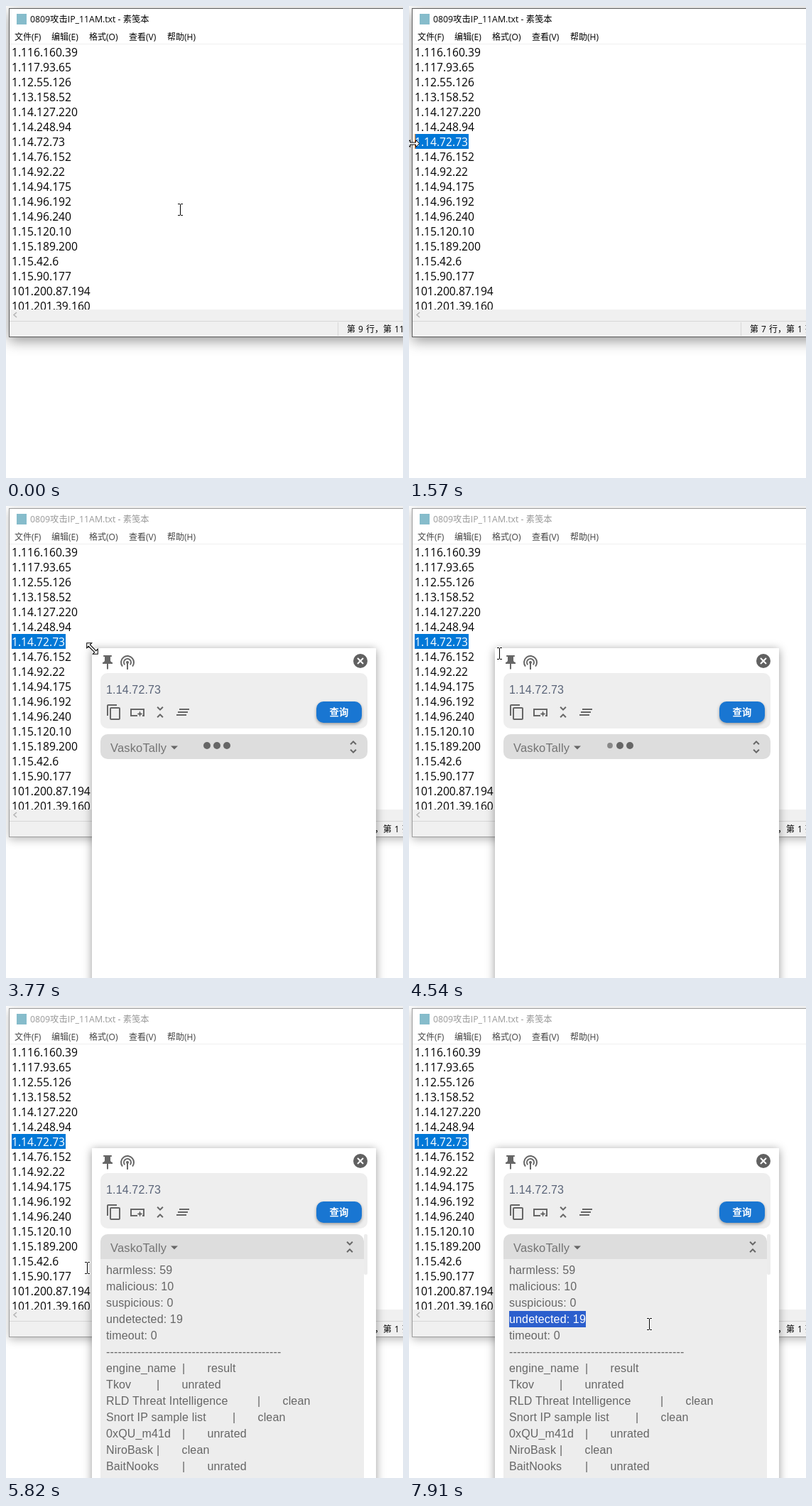
These frames come from a looping animation (559 by 664 pixels, 8000 ms). An HTML page with a canvas:

```html
<!DOCTYPE html>
<html lang="zh">
<head>
<meta charset="utf-8">
<style>
html, body { margin: 0; width: 559px; height: 664px; overflow: hidden; background: #fff; }
canvas { display: block; }
</style>
</head>
<body>
<canvas id="stage" width="559" height="664"></canvas>
<script>
const W = 559, H = 664, LOOP = 8000;
const view = document.getElementById('stage').getContext('2d');
const layer = document.createElement('canvas');
layer.width = W;
layer.height = 720;
const panelCtx = layer.getContext('2d');

const UI = '"Open Sans", "Noto Sans CJK SC", "Noto Sans CJK", sans-serif';
const ARIAL = '"Liberation Sans", Arial, sans-serif';
const LIST_FONT = '15.64px ' + UI;
const GREY = '#666';

const FOCUS = 2960, OPEN = 3000, RESULT = 4560;
const IP = '1.14.72.73';
const ips = ['1.116.160.39', '1.117.93.65', '1.12.55.126', '1.13.158.52', '1.14.127.220',
  '1.14.248.94', IP, '1.14.76.152', '1.14.92.22', '1.14.94.175', '1.14.96.192',
  '1.14.96.240', '1.15.120.10', '1.15.189.200', '1.15.42.6', '1.15.90.177',
  '101.200.87.194', '101.201.39.160'];
const menus = [['文件(F)', 12], ['编辑(E)', 64], ['格式(O)', 117], ['查看(V)', 173], ['帮助(H)', 227]];
const counts = ['harmless: 59', 'malicious: 10', 'suspicious: 0', 'undetected: 19', 'timeout: 0', '-'.repeat(45)];
// name, x of the bar, verdict
const engines = [['engine_name', 248, 'result'], ['Tkov', 212, 'unrated'],
  ['RLD Threat Intelligence', 354, 'clean'], ['Snort IP sample list', 319, 'clean'],
  ['0xQU_m41d', 248, 'unrated'], ['NiroBask', 212, 'clean'], ['BaitNooks', 248, 'unrated']];

// pointer path: time, x, y
const path = [[0, 245, 286], [30, 245, 286], [450, 172, 238], [800, 92, 200], [870, 90, 199],
  [1370, 5, 193], [1570, 5, 193], [1920, 121, 203], [2830, 121, 203], [2960, 121, 200],
  [4400, 121, 200], [4480, 124, 202], [5130, 259, 389], [5290, 259, 389], [5400, 274, 384],
  [5600, 132, 372], [5750, 132, 372], [5850, 109, 367], [6000, 281, 404], [6260, 281, 404],
  [6320, 272, 419], [6600, 272, 419], [6660, 254, 416], [6820, 254, 416], [7050, 275, 402],
  [7250, 150, 370], [7620, 133, 447], [7650, 133, 447], [7720, 109, 447], [7905, 338, 447],
  [8000, 338, 447]];

const icons = {
  pin: 'M16 9V4h1c.55 0 1-.45 1-1s-.45-1-1-1H7c-.55 0-1 .45-1 1s.45 1 1 1h1v5c0 1.66-1.34 3-3 3v2h5.97v7l1 1 1-1v-7H19v-2c-1.66 0-3-1.34-3-3z',
  copy: 'M16 1H4c-1.1 0-2 .9-2 2v14h2V3h12V1zm3 4H8c-1.1 0-2 .9-2 2v14c0 1.1.9 2 2 2h11c1.1 0 2-.9 2-2V7c0-1.1-.9-2-2-2zm0 16H8V7h11v14z',
  fold: 'M7.41 18.59L8.83 20 12 16.83 15.17 20l1.41-1.41L12 14l-4.59 4.59zm9.18-13.18L15.17 4 12 7.17 8.83 4 7.41 5.41 12 10l4.59-4.59z',
  unfold: 'M12 5.83L15.17 9l1.41-1.41L12 3 7.41 7.59 8.83 9 12 5.83zm0 12.34L8.83 15l-1.41 1.41L12 21l4.59-4.59L15.17 15 12 18.17z',
  lines: 'M5 13h14v-2H5v2zm-2 4h14v-2H3v2zM7 7v2h14V7H7z',
  drop: 'M7 10l5 5 5-5z'
};
for (const k in icons) icons[k] = new Path2D(icons[k]);

const clamp = (v, a = 0, b = 1) => Math.min(b, Math.max(a, v));
const smooth = p => p * p * (3 - 2 * p);
const out = p => 1 - (1 - p) ** 2;

function pointer(t) {
  let i = 1;
  while (i < path.length - 1 && path[i][0] <= t) i++;
  const [t0, x0, y0] = path[i - 1], [t1, x1, y1] = path[i];
  const p = smooth(clamp((t - t0) / (t1 - t0)));
  return { x: Math.round(x0 + (x1 - x0) * p), y: Math.round(y0 + (y1 - y0) * p) };
}

function rect(c, x, y, w, h, color) {
  c.fillStyle = color;
  c.fillRect(x, y, w, h);
}

function round(c, x, y, w, h, r, color) {
  c.fillStyle = color;
  c.beginPath();
  c.roundRect(x, y, w, h, r);
  c.fill();
}

function text(c, s, x, y, font, color, gap = 0) {
  c.font = font;
  c.letterSpacing = gap + 'px';
  c.fillStyle = color;
  c.fillText(s, x, y);
}

function shadow(c, color, blur, dy, draw) {
  c.save();
  c.shadowColor = color;
  c.shadowBlur = blur;
  c.shadowOffsetY = dy;
  draw();
  c.restore();
}

function icon(c, name, cx, cy) {
  c.save();
  c.translate(cx - 12, cy - 12);
  c.fillStyle = GREY;
  c.fill(icons[name]);
  c.restore();
}

function disc(c, x, y, r, color) {
  c.fillStyle = color;
  c.beginPath();
  c.arc(x, y, r, 0, 7);
  c.fill();
}

function drawList(c, color) {
  ips.forEach((ip, i) => text(c, ip, 8, 70.5 + i * 21, LIST_FONT, color));
}

function drawEditor(c, t, mouse) {
  const active = t < FOCUS;
  shadow(c, active ? 'rgba(0,0,0,.42)' : 'rgba(0,0,0,.28)', active ? 18 : 12, active ? 5 : 3,
    () => rect(c, 4, 3, 620, 463, active ? '#5c5c5c' : '#9c9c9c'));
  rect(c, 5, 4, 620, 461, '#fff');
  rect(c, 15, 11, 14, 15, '#86bccb');
  text(c, '0809攻击IP_11AM.txt - 素笺本', 34, 23, '12.3px ' + UI, active ? '#000' : '#999');
  for (const [s, x] of menus) text(c, s, x, 48, '12px ' + UI, active ? '#000' : '#444');
  rect(c, 5, 53, 560, 1, '#f0f0f0');

  c.save();
  c.beginPath();
  c.rect(5, 54, 560, 373);
  c.clip();
  drawList(c, '#000');

  // drag selection from the end of the line to the left
  let col = 11, left = 84;
  c.font = LIST_FONT;
  c.letterSpacing = '0px';
  if (t >= 870) {
    const end = t >= 1370 ? 0 : mouse.x;
    while (col > 1 && 8 + c.measureText(IP.slice(0, col - 1)).width > end + 3) col--;
    left = Math.round(8 + c.measureText(IP.slice(0, col - 1)).width);
    c.save();
    c.beginPath();
    c.rect(left, 180, 84 - left, 21);
    c.clip();
    rect(c, 0, 180, 100, 21, '#0078d7');
    text(c, IP, 8, 196.5, LIST_FONT, '#fff');
    c.restore();
    const on = t < 1900 || (t >= 2430 && active);
    if (on) rect(c, left, 180, 1, 21, col < 11 ? '#ff8728' : '#000');
  } else if (t >= 200 && t < 730) {
    rect(c, 83, 222, 1, 21, '#000');
  }
  c.restore();

  rect(c, 5, 427, 560, 38, '#f0f0f0');
  rect(c, 5, 443, 560, 1, '#d7d7d7');
  rect(c, 467, 445, 1, 19, '#d7d7d7');
  c.strokeStyle = '#b4b4b4';
  c.lineWidth = 1.5;
  c.beginPath();
  c.moveTo(15, 431);
  c.lineTo(11, 434.5);
  c.lineTo(15, 438);
  c.stroke();
  c.wordSpacing = '0.9px';
  text(c, `第 ${t < 870 ? 9 : 7} 行，第 ${col} 列`, 480, 459, '12px ' + UI, '#000');
  c.wordSpacing = '0px';
}

function drawTools(c) {
  icon(c, 'pin', 143, 220);
  c.strokeStyle = GREY;
  c.lineWidth = 2;
  for (const [r, a] of [[9, 2.25], [5, 2.3]]) {
    c.beginPath();
    c.arc(171, 220, r, -Math.PI / 2 - a, -Math.PI / 2 + a);
    c.stroke();
  }
  disc(c, 171, 220, 2, GREY);
  rect(c, 170, 220, 2, 10, GREY);

  disc(c, 499, 218, 10, '#616161');
  c.strokeStyle = '#fff';
  c.beginPath();
  for (const s of [1, -1]) {
    c.moveTo(495, 218 - 4 * s);
    c.lineTo(503, 218 + 4 * s);
  }
  c.stroke();

  icon(c, 'copy', 152, 290);
  icon(c, 'fold', 217, 290);
  icon(c, 'lines', 249, 290);
  c.strokeStyle = GREY;
  c.beginPath();
  c.moveTo(185, 295);
  c.lineTo(176, 295);
  c.lineTo(176, 286);
  c.lineTo(194, 286);
  c.lineTo(194, 295);
  c.lineTo(192, 295);
  c.stroke();
  c.fillStyle = GREY;
  c.beginPath();
  for (let i = 0; i < 8; i++) {
    const r = i % 2 ? 1.6 : 4.2, a = i * Math.PI / 4;
    c.lineTo(188.5 + r * Math.cos(a), 292.5 + r * Math.sin(a));
  }
  c.fill();
}

function drawResult(c, t, mouse) {
  const grow = out(clamp((t - RESULT) / 220));
  c.save();
  c.beginPath();
  c.rect(133, 356, 371, 320 * grow);
  c.clip();
  rect(c, 133, 356, 371, 400, '#ededed');
  const font = '16px ' + ARIAL, base = i => 377 + 23 * i;
  counts.forEach((s, i) => text(c, s, 141, base(i), font, GREY, .15));
  engines.forEach(([name, x, verdict], i) => {
    const y = base(i + counts.length);
    text(c, name, 141, y, font, GREY, .15);
    text(c, '|', x, y, font, GREY, .15);
    text(c, verdict, x + 35.5, y, font, GREY, .15);
  });
  if (t > 7720 && mouse.x > 141) {
    c.beginPath();
    c.rect(141, 429, Math.min(108, mouse.x - 141), 23);
    c.clip();
    rect(c, 141, 429, 108, 23, '#2c5fcd');
    text(c, counts[3], 141, base(3), font, '#fff', .15);
  }
  c.restore();
  round(c, 504, 321, 5, 57, 2, '#ececec');
}

function drawDots(c, t) {
  for (let i = 0; i < 3; i++) {
    const q = ((t - 3090 + 6800) % 680) / 680;
    const dip = Math.sin(Math.PI * clamp((q - i * .2) / .5)) ** 2;
    c.save();
    c.globalAlpha = 1 - .5 * dip;
    disc(c, 283 + 14 * i, 337, 5 - 2 * dip, GREY);
    c.restore();
  }
}

function drawPanel(c, t, mouse) {
  c.clearRect(0, 0, W, 720);
  shadow(c, 'rgba(0,0,0,.4)', 12, 2, () => rect(c, 121, 200, 400, 560, '#fff'));
  round(c, 133, 235, 376, 78, 10, '#eee');
  drawTools(c);
  text(c, IP, 141, 264, '16px ' + ARIAL, '#5a6478', .15);
  if (t < 5490 && Math.floor((t - 2990) / 500) % 2 === 0) rect(c, 218, 250, 1, 17, '#333');

  shadow(c, 'rgba(0,0,0,.35)', 4, 2, () => round(c, 437, 275, 64, 30, 10, '#1976d2'));
  text(c, '查询', 455.5, 294.5, 'bold 13.3px ' + UI, '#fff', .3);

  const done = t >= RESULT;
  round(c, 133, 321, done ? 371 : 376, 35, done ? [10, 10, 0, 0] : 10, '#ddd');
  text(c, 'VaskoTally', 147, 346, '16.5px ' + ARIAL, '#737373', .15);
  icon(c, 'drop', 237, 339.5);
  icon(c, done ? 'fold' : 'unfold', done ? 484 : 489, 339);
  if (done) drawResult(c, t, mouse);
  else drawDots(c, t);
}

function beam(c, x, y) {
  const parts = [[x, y - 7, 1, 15], [x - 3, y - 8, 3, 1], [x + 1, y - 8, 3, 1], [x - 3, y + 8, 3, 1], [x + 1, y + 8, 3, 1]];
  for (const [a, b, w, h] of parts) rect(c, a - 1, b - 1, w + 2, h + 2, 'rgba(255,255,255,.8)');
  for (const [a, b, w, h] of parts) rect(c, a, b, w, h, '#000');
}

function arrows(c, x, y, angle, len) {
  c.save();
  c.translate(x + .5, y + .5);
  c.rotate(angle);
  c.beginPath();
  for (const s of [-1, 1]) {
    const k = len - 5;
    for (const [a, b] of [[k, 1.5], [k, 5], [len, 0], [k, -5], [k, -1.5]]) c.lineTo(a * s, b * s);
  }
  c.closePath();
  c.fillStyle = '#fff';
  c.strokeStyle = '#000';
  c.lineWidth = 1;
  c.fill();
  c.stroke();
  c.restore();
}

function drawPointer(c, t, { x, y }) {
  if (t >= FOCUS && t < 4500) return arrows(c, x, y, Math.PI / 4, 11);
  const edge = t < FOCUS ? 5 : 121;
  if (Math.abs(x - edge) < 4 && (t < 1900 || t > FOCUS)) arrows(c, x, y, 0, 9);
  else beam(c, x, y);
}

function draw(t) {
  const mouse = pointer(t);
  rect(view, 0, 0, W, H, '#fff');
  drawEditor(view, t, mouse);
  if (t >= OPEN) {
    const e = out(clamp((t - OPEN) / 240)), s = .955 + .045 * e;
    drawPanel(panelCtx, t, mouse);
    view.save();
    view.globalAlpha = e;
    view.translate(321, 440);
    view.scale(s, s);
    view.drawImage(layer, -321, -440);
    view.restore();
  }
  drawPointer(view, t, mouse);
}

const start = performance.now();
function tick() {
  draw((performance.now() - start) % LOOP);
  requestAnimationFrame(tick);
}
tick();
</script>
</body>
</html>
```
